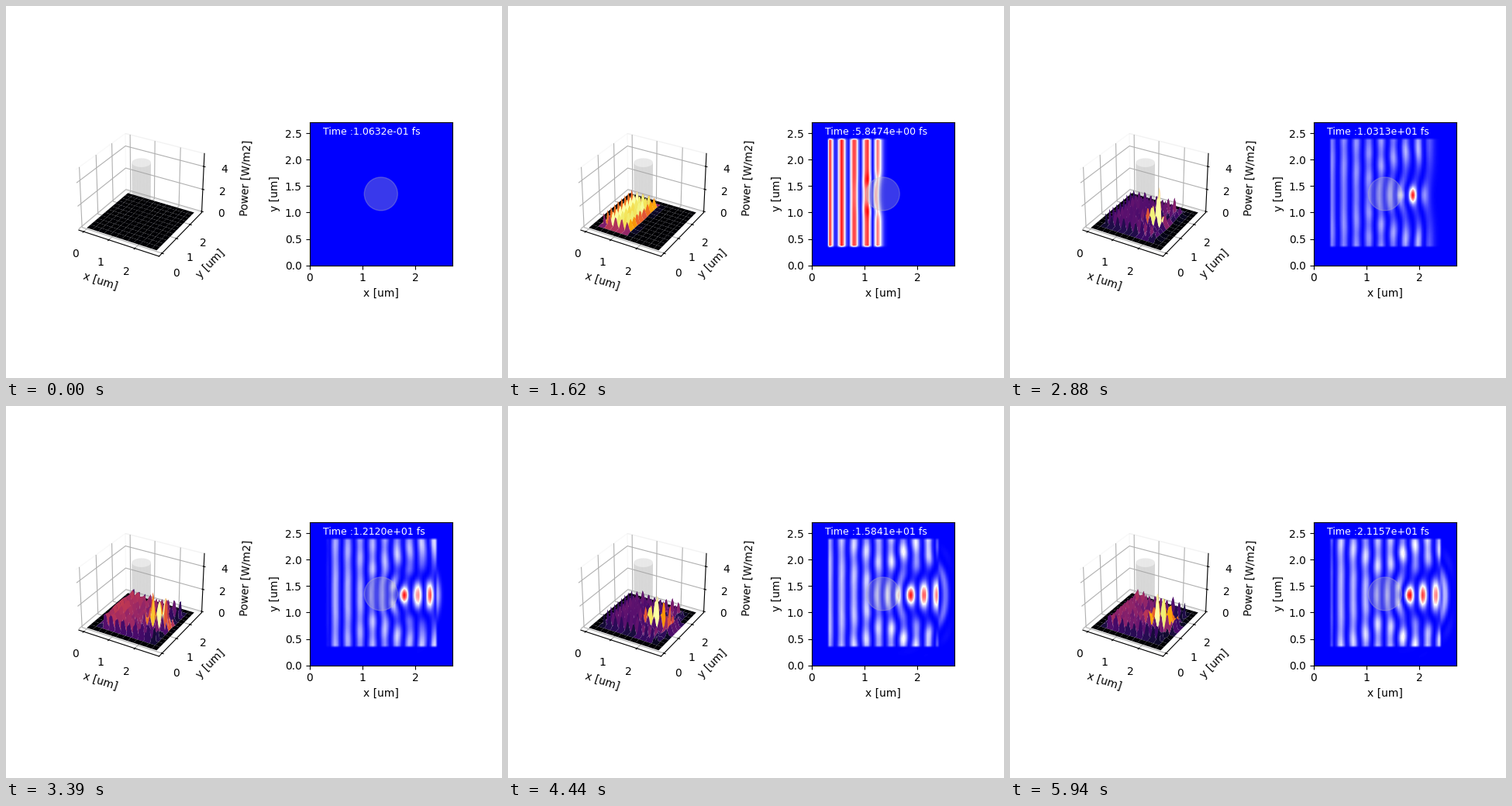
Recreate the animation shown at these times as a matplotlib script. Size 640x480 px, loop 5.97 s.

```python
import numpy as np
import matplotlib.pyplot as plt
from matplotlib.animation import FuncAnimation
from matplotlib.patches import Circle
from mpl_toolkits.mplot3d.art3d import Poly3DCollection

STEPS = 199
DT_FS = 0.106317            # time shown per step
N = 60                      # grid cells per side
DX = 0.045075               # cell size in um
L = N * DX
NPML = 8
IA, IB = 7, 52              # total-field box along x
JA, JB = 8, 52              # total-field box along y
CX, CY, RADIUS = 30, 29, 7  # dielectric cylinder in cells
EPS = 1.4
OMEGA = 2 * np.pi / 20.93   # source phase per step


def pml():
    """Absorbing profiles: g2, g3 for D and f1, f2, f3 for H."""
    g, f = np.zeros(N), np.zeros(N)
    for n in range(NPML):
        g[n] = g[N - 1 - n] = 0.33 * ((NPML - n) / NPML) ** 3
        f[n] = f[N - 2 - n] = 0.25 * ((NPML - n - 0.5) / NPML) ** 3
    return 1 / (1 + g), (1 - g) / (1 + g), f, 1 / (1 + f), (1 - f) / (1 + f)


def inverse_eps():
    """1/eps per cell, averaged over sub-cells at the cylinder rim."""
    sub = 5
    off = (np.arange(sub) - (sub - 1) / 2) / sub
    p = (np.arange(N)[:, None] + off).ravel()
    inside = (p[:, None] - CX) ** 2 + (p[None, :] - CY) ** 2 <= RADIUS ** 2
    fill = inside.reshape(N, sub, N, sub).mean(axis=(1, 3))
    return 1 / (1 + (EPS - 1) * fill)


def simulate():
    """2D TM FDTD with a plane wave along x; returns Ez^2 as [step, y, x]."""
    g2, g3, f1, f2, f3 = pml()
    keep, gain = np.outer(g3, g3), np.outer(g2, g2)
    ga = inverse_eps()
    dz, ez, hx, hy, ihx, ihy = (np.zeros((N, N)) for _ in range(6))
    e_inc, h_inc = np.zeros(N), np.zeros(N)
    low, high = [0.0, 0.0], [0.0, 0.0]
    xs, ys = slice(IA, IB + 1), slice(JA, JB + 1)
    out = np.zeros((STEPS, N, N))

    for t in range(1, STEPS + 1):
        e_inc[1:] += 0.5 * (h_inc[:-1] - h_inc[1:])
        e_inc[0] = low.pop(0)
        low.append(e_inc[1])
        e_inc[-1] = high.pop(0)
        high.append(e_inc[-2])

        curl = hy[1:, 1:] - hy[:-1, 1:] - hx[1:, 1:] + hx[1:, :-1]
        dz[1:, 1:] = keep[1:, 1:] * dz[1:, 1:] + 0.5 * gain[1:, 1:] * curl
        e_inc[3] = np.sin(OMEGA * t)
        dz[IA, ys] += 0.5 * h_inc[IA - 1]
        dz[IB, ys] -= 0.5 * h_inc[IB]
        ez = ga * dz

        h_inc[:-1] += 0.5 * (e_inc[:-1] - e_inc[1:])

        curl = ez[:, :-1] - ez[:, 1:]
        ihx[:, :-1] += curl
        hx[:, :-1] = f3[:-1] * hx[:, :-1] + f2[:-1] * (
            0.5 * curl + f1[:, None] * ihx[:, :-1])
        hx[xs, JA - 1] += 0.5 * e_inc[xs]
        hx[xs, JB] -= 0.5 * e_inc[xs]

        curl = ez[:-1] - ez[1:]
        ihy[:-1] += curl
        hy[:-1] = f3[:-1, None] * hy[:-1] - f2[:-1, None] * (
            0.5 * curl + f1 * ihy[:-1])
        hy[IA - 1, ys] -= 0.5 * e_inc[IA]
        hy[IB, ys] += 0.5 * e_inc[IB]

        out[t - 1] = ez.T ** 2
    return out


def perimeters(step=5):
    """Flat indices around each coarse patch of the grid."""
    idx = np.arange(N * N).reshape(N, N)
    cuts = list(range(0, N - 1, step)) + [N - 1]
    rings = []
    for r0, r1 in zip(cuts, cuts[1:]):
        for c0, c1 in zip(cuts, cuts[1:]):
            rings.append(np.concatenate([
                idx[r0, c0:c1], idx[r0:r1, c1],
                idx[r1, c1:c0:-1], idx[r1:r0:-1, c0]]))
    return rings


power = simulate()
rings = perimeters()
axis = np.linspace(0, L, N)
gx, gy = (a.ravel() for a in np.meshgrid(axis, axis))


def patches(z):
    z = z.ravel()
    verts = [np.column_stack([gx[r], gy[r], z[r]]) for r in rings]
    return verts, np.array([z[r].mean() for r in rings])


fig = plt.figure(figsize=(6.4, 4.8), dpi=100)
fig.subplots_adjust(wspace=0.69)

# 3D view
ax3 = fig.add_subplot(1, 2, 1, projection='3d', computed_zorder=False)
ang, height = np.meshgrid(np.linspace(0, 2 * np.pi, 49), [0, 5])
rad = RADIUS * DX
ax3.plot_surface(L / 2 + rad * np.cos(ang), L / 2 + rad * np.sin(ang), height,
                 rstride=1, cstride=1, color=(0.65, 0.65, 0.65), alpha=0.25,
                 shade=False, linewidth=0, zorder=1)
surf = Poly3DCollection(patches(power[0])[0], cmap='inferno', zorder=2)
ax3.add_collection3d(surf)

pad = 1.1 * L / 48
ax3.set_xlim(-0.05 * L - pad, 1.05 * L + pad)
ax3.set_ylim(-0.05 * L - pad, 1.05 * L + pad)
ax3.set_zlim(-5 / 48, 5 + 5 / 48)
ax3.set_xticks([0, 1, 2])
ax3.set_yticks([0, 1, 2])
ax3.set_zticks([0, 2, 4])
ax3.set_xlabel('x [um]')
ax3.set_ylabel('y [um]')
ax3.set_zlabel('Power [W/m2]')
for a in (ax3.xaxis, ax3.yaxis, ax3.zaxis):
    a.pane.fill = False

# Top view
ax2 = fig.add_subplot(1, 2, 2)
img = ax2.imshow(power[0], cmap='bwr', origin='lower', extent=(0, L, 0, L),
                 interpolation='bilinear')
ax2.add_patch(Circle((L / 2, L / 2), rad, color='silver', alpha=0.3))
label = ax2.text(0.25, 2.48, '', color='white', fontsize=9)
ax2.set_xticks([0, 1, 2])
ax2.set_yticks(np.arange(0, 2.6, 0.5))
ax2.set_xlabel('x [um]')
ax2.set_ylabel('y [um]')


def update(i):
    z = power[i]
    verts, mean = patches(z)
    surf.set_verts(verts)
    surf.set_array(mean)
    surf.set_clim(0, max(mean.max(), 1e-30))
    img.set_data(z)
    img.set_clim(0, max(z.max(), 1e-30))
    label.set_text(f'Time :{(i + 1) * DT_FS:.4e} fs')
    return surf, img, label


anim = FuncAnimation(fig, update, frames=STEPS, interval=30, repeat=True,
                     repeat_delay=0, blit=False)
plt.show()
```
